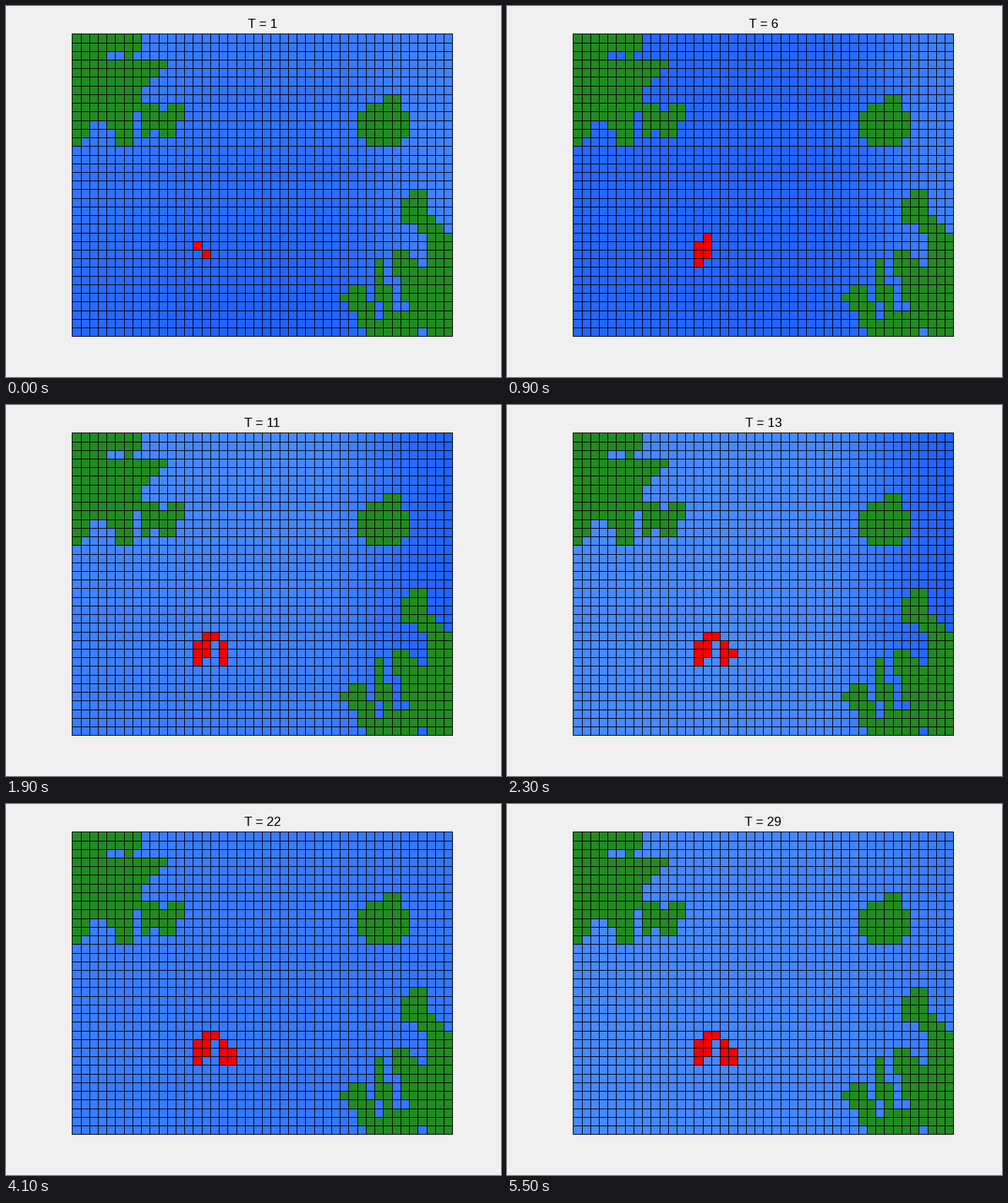
A matplotlib script that plays this animation: 700 px wide and 525 px high, repeating every 5700 ms.

```python
import numpy as np
import matplotlib.pyplot as plt
from matplotlib.animation import FuncAnimation
from matplotlib.path import Path

W, H, DPI = 700, 525, 100
COLS, ROWS, CELL = 44, 35, 12.225
X_LINES = np.rint(93.3 + CELL * np.arange(COLS + 1)).astype(int)
Y_LINES = np.rint(39.375 + CELL * np.arange(ROWS + 1)).astype(int)
GREEN, RED = (34, 139, 34), (255, 0, 0)
DEEP, PALE = np.array([27, 91, 255]), np.array([75, 140, 255])

# Coastlines, in cell units
WEST = [(0, 0), (8, 0), (8, 1.8), (7, 2.6), (11, 3.3), (8, 6.3), (8, 7.8),
        (13, 7.8), (12.2, 12), (8, 12), (8, 9), (7, 9), (7, 13), (5.2, 13),
        (4.2, 10), (2, 10), (2, 12), (0, 13.5)]
EAST = [(44, 35), (44, 23.2), (41, 20.5), (41, 18), (39, 18), (38, 19.3),
        (38, 22), (39.6, 22), (41, 23.5), (41, 27), (40.2, 27), (39, 25),
        (37, 25), (37, 28), (38, 28), (38, 31), (37, 31), (37, 29), (36, 29),
        (36, 26), (35, 26), (35, 31), (34, 31), (34, 29), (32, 29),
        (31, 30.2), (34.2, 35)]
# Circles: x, y, radius
ISLAND = [(36, 10.5, 2.83), (37, 8, 1)]
LAKES = [(5, 2.5, .6), (10.5, 8.5, .5), (9.5, 11.5, .5),
         (35.5, 32, .6), (38, 31.5, .6), (40.5, 34.5, .5)]

# Spreading cells (column, row) in the order they appear
SPILL = [(14, 24), (15, 25), (15, 24), (14, 25), (14, 26), (15, 23),
         (16, 23), (17, 24), (17, 25), (17, 26), (18, 25), (18, 26)]

# Swell height over time in the west, middle and east
KEYS = [1, 6, 9, 13, 17, 22, 29]
SWELL = [(.5, .25, .65, .95, .35, .7, .93),
         (.35, .2, .7, .93, .87, .6, .87),
         (.8, .75, .15, .15, .1, .55, .68)]

cx, cy = np.meshgrid(np.arange(COLS) + .5, np.arange(ROWS) + .5)
centres = np.column_stack([cx.ravel(), cy.ravel()])


def inside(coast):
    return Path(coast + coast[:1]).contains_points(centres).reshape(cx.shape)


def discs(circles):
    return np.any([np.hypot(cx - x, cy - y) <= r for x, y, r in circles], axis=0)


def smooth(u):
    u = np.clip(u, 0, 1)
    return u * u * (3 - 2 * u)


land = (inside(WEST) | inside(EAST) | discs(ISLAND)) & ~discs(LAKES)
near_west = 1 - smooth(cx / 22)
near_east = smooth((cx - 28) / 16)


def water(t):
    west, mid, east = (np.interp(t, KEYS, s) for s in SWELL)
    tilt = .25 + .25 * np.cos(np.pi * (t - 1) / 4)
    v = mid + (west - mid) * near_west + (east - mid) * near_east
    v += tilt * (.5 - cy / ROWS) * (1 - near_east)
    return DEEP + (PALE - DEEP) * np.clip(v, 0, 1)[..., None]


def sea_map(t):
    cells = np.rint(water(t)).astype(np.uint8)
    cells[land] = GREEN
    for c, r in SPILL[:round(1.2 + .77 * t)]:
        cells[r, c] = RED
    img = cells.repeat(np.diff(Y_LINES), axis=0).repeat(np.diff(X_LINES), axis=1)
    img = np.pad(img, ((0, 1), (0, 1), (0, 0)))
    img[Y_LINES - Y_LINES[0]] = 0
    img[:, X_LINES - X_LINES[0]] = 0
    return img


fig = plt.figure(figsize=(W / DPI, H / DPI), dpi=DPI, facecolor="#f0f0f0")
ax = fig.add_axes([0, 0, 1, 1])
ax.axis("off")
box = (X_LINES[0], X_LINES[-1] + 1, Y_LINES[-1] + 1, Y_LINES[0])
picture = ax.imshow(sea_map(1), extent=box, interpolation="nearest", aspect="auto")
title = ax.text(362.5, 31, "T = 1", family="Liberation Sans", fontsize=13.2,
                ha="center", va="baseline", color="black")
ax.set_xlim(0, W)
ax.set_ylim(H, 0)


def update(i):
    t = 1 + (i + 1) // 2
    picture.set_data(sea_map(t))
    title.set_text(f"T = {t}")
    return picture, title


anim = FuncAnimation(fig, update, frames=57, interval=100, repeat=True,
                     repeat_delay=0, blit=False)
plt.show()
```
